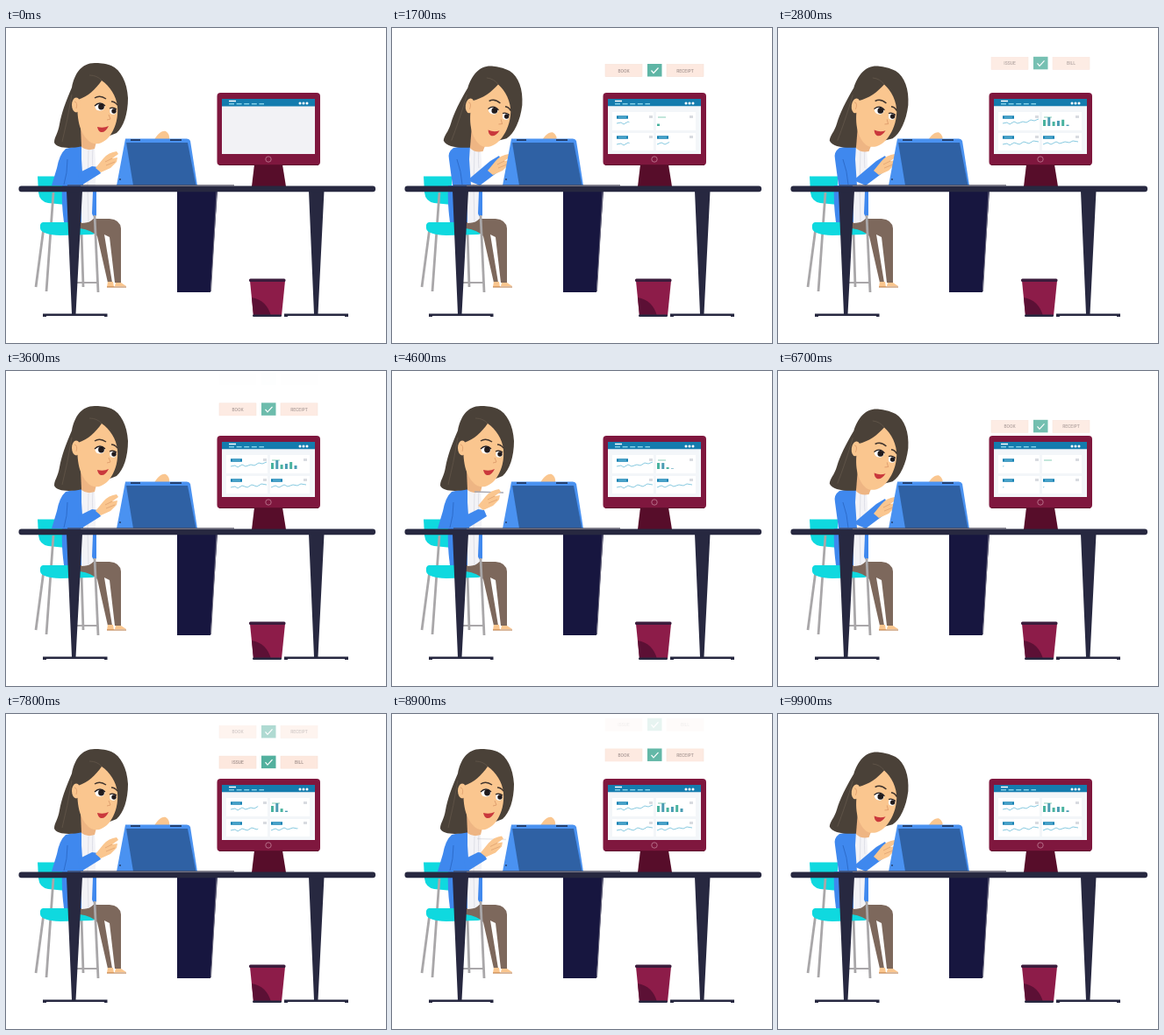
An HTML page for the animation above (10000 ms loop, 433x360 px).

```html
<!DOCTYPE html>
<html lang="en">
<head>
<meta charset="utf-8">
<title>Desk with receipts</title>
<style>
html, body { margin: 0; width: 100%; height: 100%; overflow: hidden; background: #fff; }
svg { display: block; width: 433px; height: 360px; }
text { font: 500 5px Roboto, Arial, sans-serif; fill: #a3918d; text-anchor: middle; }
.skin { fill: #fac68f; }
.blue { fill: #3f88ee; }
.navy { fill: #272840; }
.hair { fill: #4a4138; }
.pants { fill: #7d685c; }
.cyan { fill: #0fd9df; }
.metal { fill: none; stroke: #a9a7a9; stroke-width: 2.8; }
.graph { fill: none; stroke: #7cc4dd; stroke-width: .9; }
</style>
</head>
<body>
<svg viewBox="0 0 433 360">
  <!-- chair -->
  <path class="cyan" d="M36 169.500H68V202L48 200Q38 198 37 188Z"/>
  <path class="metal" d="M54 188L46 301M43 228L34 296M86 232L88 296"/>
  <path class="cyan" d="M42 222H72L100 229Q104 236 98 236L62 237Q40 236 39 229Q38 223 42 222Z"/>

  <!-- seated figure -->
  <path class="pants" d="M84 218H118Q130 219 131 229V291H124L118 239L112 236L121 291H116L104 238Q98 231 84 229Z"/>
  <path class="skin" d="M116 290H122L123 296H115ZM125 291H131L137 295H124Z"/>
  <path d="M115 296H137" stroke="#b5733a" stroke-width="1"/>
  <path class="blue" d="M64 180H88L86 222H66Q63 200 64 180Z"/>
  <path d="M84 134L100 130Q103 150 102 180V212Q100 223 86 223Z" fill="#f3f3f7"/>
  <path d="M94 140Q92 180 94 222M99 137Q98 152 99 160" fill="none" stroke="#dfe0e8"/>
  <path class="blue" d="M99 187H103V214Q100 218 98 212Z"/>
  <path class="blue" id="jacket"/>
  <path id="fold" fill="none" stroke="#2d6ccb"/>
  <g id="head">
    <path class="hair" d="M101 40C86 40 78 52 75 68C68 84 63 98 61 110C59 122 55 124 55 131C58 138 74 138 88 135L126 120C134 113 139 98 139 80C138 62 131 48 120 43C112 40 106 40 101 40Z"/>
    <path d="M85 112L104 126L101 138Q92 141 86 136Z" fill="#eeb583"/>
    <path class="skin" d="M109 60C102 70 94 78 82 82C80 100 83 122 97 131C105 135 115 130 121 119C125 112 128 102 127 90C126 78 118 66 109 60Z"/>
    <ellipse class="skin" cx="80" cy="88" rx="5" ry="8.500"/>
    <path d="M78 84Q82 85 80 92" fill="none" stroke="#e3a673"/>
    <path d="M75 76Q70 106 64 130M109 60Q104 54 95 54" fill="none" stroke="#62564a" stroke-width=".8"/>
    <path d="M101 80Q107 76 114 81M120 84Q124 84 127 88" fill="none" stroke="#40342d" stroke-width="1.5"/>
    <ellipse cx="107" cy="90" rx="5.5" ry="4.5" fill="#fff"/>
    <ellipse cx="122" cy="95" rx="3.8" ry="3.8" fill="#fff"/>
    <circle cx="108.500" cy="90" r="3.4" fill="#211b1d"/>
    <circle cx="123" cy="95" r="2.700" fill="#211b1d"/>
    <path d="M101 89Q107 83 113 89M118 92Q122 90 126 93" fill="none" stroke="#211b1d" stroke-width="1.2"/>
    <path d="M117 99L119 104L115 105" fill="none" stroke="#e0a06f"/>
    <path d="M104 113Q111 115 117 112Q113 120 108 119Q105 118 104 113Z" fill="#c9383c"/>
  </g>
  <path class="blue" id="forearm"/>
  <g id="hand">
    <path id="pen" d="M98 144L131 145" stroke="#a9a9b3" stroke-width="1.5"/>
    <path class="skin" d="M102 160L111 149Q117 142 126 141L128 144L121 149L127 148L126 153L119 160L108 165Z"/>
    <path d="M113 153L121 149M114 157L124 153" stroke="#dfa170" stroke-width=".8"/>
  </g>
  <path class="skin" id="farHand" d="M169 128C172 122 177 117 182 118Q187 121 186 128Z"/>

  <!-- tablet -->
  <path d="M136 126.500H206Q209 126.500 210 129L218 180H126Z" fill="#4a92f1"/>
  <path d="M137 131H207L216.500 180H145Z" fill="#2f61a4"/>
  <path d="M142 128H153M187 128H200" stroke="#24406f" stroke-width="2"/>
  <circle cx="130" cy="173" r="1" fill="#24406f"/>

  <g id="rows"></g>

  <!-- monitor -->
  <path d="M283 156H315L319 181H280Z" fill="#570d2a"/>
  <rect x="240.500" y="74" width="117.500" height="83" rx="4" fill="#7f173e"/>
  <path d="M243 156.500H356" stroke="#5e0f2d"/>
  <rect x="246" y="81" width="106" height="63" fill="#f2f2f5"/>
  <rect x="246" y="81" width="106" height="8.500" fill="#147cae"/>
  <path d="M254 83.500H262" stroke="#fff" stroke-width="1.5"/>
  <path d="M254 86.700H294" stroke="#82d0e8" stroke-width="1.4" stroke-dasharray="6 2.600"/>
  <g fill="#fff"><circle cx="335" cy="86" r="1.5"/><circle cx="339" cy="86" r="1.5"/><circle cx="343" cy="86" r="1.5"/></g>
  <circle cx="299" cy="150" r="3.2" fill="none" stroke="#c27f98" stroke-width=".8"/>
  <g id="cards">
    <rect x="246" y="89.500" width="106" height="54.500" fill="#f3f6f9"/>
    <path d="M251 96H298V117H251ZM301 96H346V117H301ZM251 120H298V140H251ZM301 120H346V140H301Z" fill="#fff"/>
    <path d="M256 102H269M256 125H269M302 125H315" stroke="#1682b4" stroke-width="3.6"/>
    <path d="M258 102H267M258 125H267M304 125H313" stroke="#8fd0e8" stroke-width=".8"/>
    <path d="M303 102H312" stroke="#a3d8c8" stroke-width="1.3"/>
    <path d="M293 101.500H297M339 101.500H343M293 124.500H297M339 124.500H343" stroke="#d8dbe0" stroke-width="3"/>
    <path class="graph" pathLength="100" d="M256 109L261 108L264 110L269 107L273 109L279 107L283 108L288 105L292 106L297 104"/>
    <path class="graph" pathLength="100" d="M256 133L261 132L264 134L269 131L275 133L280 130L286 132L291 129L297 130"/>
    <path class="graph" pathLength="100" d="M302 133L307 131L311 133L317 130L321 132L327 130L332 131L336 129L342 130"/>
    <g id="bars"></g>
  </g>

  <!-- desk -->
  <path d="M195 186H241L233 302H195Z" fill="#17163f"/>
  <path d="M240 187L233.500 301" stroke="#6d6b80"/>
  <path class="metal" d="M101 214L105 302"/>
  <path class="metal" d="M80 291H104" style="stroke-width:2"/>
  <path class="navy" d="M69 186H87L79.500 327H75ZM345 186H362.500L355.500 327H351Z"/>
  <path class="navy" d="M42 330V326.500H115.500V330H112V329H46V330ZM317 330V326.500H390V330H386V329H321V330Z"/>
  <path d="M70 179.800H260" stroke="#4a4857"/>
  <rect class="navy" x="14.500" y="180.500" width="406.500" height="6.800" rx="3"/>

  <!-- bin -->
  <path d="M278 289H318L314 329H282Z" fill="#8d1c49"/>
  <path d="M280 308Q297 311 302 329H282Z" fill="#5c1035"/>
  <rect x="277" y="286.500" width="41.500" height="3.500" rx="1.500" fill="#3b1c3c"/>
  <rect x="281" y="327.500" width="33" height="2.500" rx="1.200" fill="#272840"/>
</svg>
<script>
const LOOP = 10000;
const $ = id => document.getElementById(id);
const clamp = v => Math.min(1, Math.max(0, v));
const ramp = (v, from, length) => clamp((v - from) / length);

// Eased value of a list of [time, value] points.
function track(t, points) {
  let [t0, v0] = points[0];
  for (const [t1, v1] of points) {
    if (t < t1) {
      const k = t1 > t0 ? clamp((t - t0) / (t1 - t0)) : 0;
      return v0 + (v1 - v0) * k * k * (3 - 2 * k);
    }
    [t0, v0] = [t1, v1];
  }
  return v0;
}

// Blend two paths that share the same commands.
function blend(a, b, k) {
  const end = b.match(/[\d.]+/g);
  let i = 0;
  return a.replace(/[\d.]+/g, n => (+n + (end[i++] - n) * k).toFixed(2));
}

const LEAN = [[500, 0], [900, 1], [2900, 1], [3300, 0], [4900, 0], [5300, 1],
              [7200, 1], [7600, 0], [9300, 0], [9700, 1]];
const LIFT = [[4200, 0], [4550, 1], [4650, 1], [4950, 0], [8300, 0], [8600, 1], [8700, 1], [9000, 0]];
const JACKET = ["M86 134L68 138Q61 144 58 160L52 180L88 180L86 150Z",
                "M89 134L70 137Q63 142 65 150L69 180L90 180L88 150Z"];
const FOLD = ["M70 150Q70 166 66 179", "M74 150Q79 164 80 179"];
const FOREARM = ["M82 166L98 158L105 159L108 166L84 181Z",
                 "M86 174L112 152L122 146L128 159L100 180Z"];

const NS = "http://www.w3.org/2000/svg";
const rows = [["BOOK", "RECEIPT"], ["ISSUE", "BILL"], ["BOOK", "RECEIPT"]].map(([left, right]) => {
  const g = document.createElementNS(NS, "g");
  const box = x => `<rect x="${x}" y="-7" width="42" height="14" fill="#fde8de" stroke="#f8e0d6" stroke-width=".6"/>`;
  g.innerHTML = box(243) + box(313) +
    `<text x="264" y="2">${left}</text><text x="334" y="2">${right}</text>
     <rect x="291" y="-7.5" width="16.5" height="14.5" fill="#52b09e"/>
     <path d="M295.5 0L298 3L303.5 -3" fill="none" stroke="#fff" stroke-width="1.2"/>`;
  return $("rows").appendChild(g);
});

const HEIGHTS = [7, 10, 5, 6, 8, 4];
const bars = HEIGHTS.map((h, i) => {
  const bar = document.createElementNS(NS, "rect");
  bar.setAttribute("x", 302 + i * 5.3);
  bar.setAttribute("width", 3);
  bar.setAttribute("fill", i % 2 ? "#4a9cb3" : "#49b39f");
  return $("bars").appendChild(bar);
});
const graphs = document.querySelectorAll(".graph");

function drawFigure(t) {
  const lean = track(t, LEAN), lift = track(t, LIFT);
  $("head").setAttribute("transform", `translate(${2.5 * lean} 0) rotate(${7 * lean} 76 140)`);
  $("jacket").setAttribute("d", blend(...JACKET, lean));
  $("fold").setAttribute("d", blend(...FOLD, lean));
  $("forearm").setAttribute("d", blend(...FOREARM, lean));
  $("hand").setAttribute("transform", `translate(${7 * lean - 4 * lift} ${3 * lean - 6 * lift})`);
  $("pen").setAttribute("opacity", lift);
  $("farHand").setAttribute("transform", `translate(${1.5 * lean} ${1.5 * lean})`);
}

function drawRows(t) {
  const age = (t - (t < 6000 ? 1060 : 6440)) / 1000;
  rows.forEach((row, i) => {
    const y = 73.5 - 39 * (age - i * 0.89);
    const fadeOut = y > 20 ? 0.45 + 0.55 * ramp(y, 20, 33) : 0.45 * ramp(y, 9, 11);
    row.setAttribute("transform", `translate(0 ${y})`);
    row.setAttribute("opacity", fadeOut * ramp(-y, -73, 12));
  });
}

function drawCharts(t) {
  const age = (t - (t < 6000 ? 1060 : 6550)) / 1000;
  $("cards").setAttribute("opacity", ramp(age, -0.15, 0.25) * (1 - ramp(age, 4.1, 0.3)));
  graphs.forEach(g => g.setAttribute("stroke-dasharray", `${100 * ramp(age, 0.1, 1.5)} 200`));
  bars.forEach((bar, i) => {
    const h = HEIGHTS[i] * ramp(age, 0.5 + i * 0.22, 0.4) * (1 - ramp(age, 3.3 + (4 - i) * 0.06, 0.2));
    bar.setAttribute("y", 112 - h);
    bar.setAttribute("height", h);
  });
}

const start = performance.now();
function frame() {
  const t = (performance.now() - start) % LOOP;
  drawFigure(t);
  drawRows(t);
  drawCharts(t);
  requestAnimationFrame(frame);
}
frame();
</script>
</body>
</html>
```
